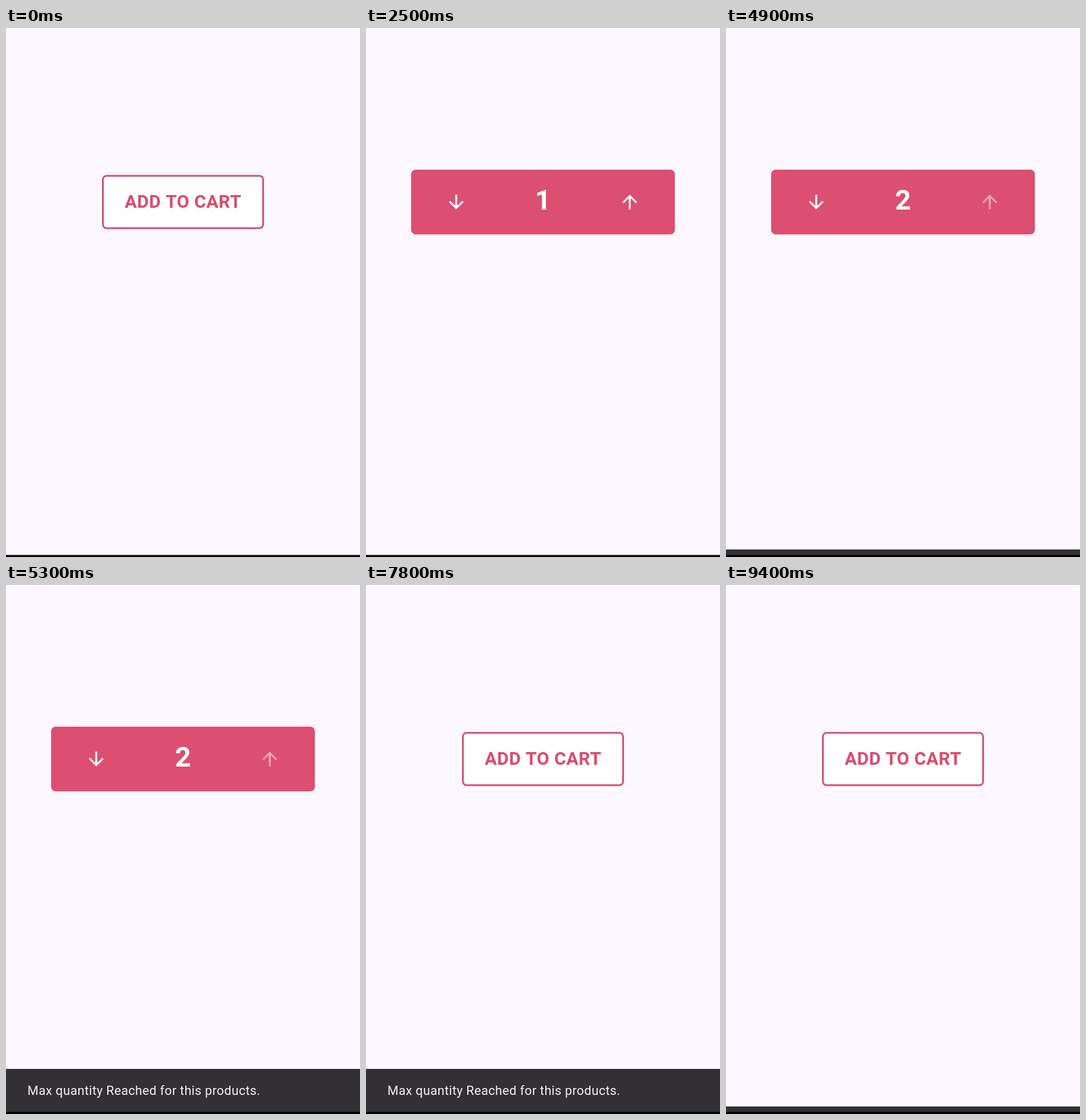
These frames come from a looping animation (612 px wide and 915 px high, 9500 ms). An HTML page with a canvas:

```html
<!DOCTYPE html>
<html lang="en">
<head>
<meta charset="utf-8">
<title>Add to cart</title>
<style>
  html, body { margin: 0; width: 100%; height: 100%; overflow: hidden; background: #fdf7ff; }
  canvas { display: block; width: 612px; height: 915px; }
</style>
</head>
<body>
<canvas id="stage" width="612" height="915"></canvas>
<script>
const ctx = document.getElementById('stage').getContext('2d');
const LOOP = 9500, STEP = 100;
const RED = '#dc4f71', EDGE = '#d94c70';
const FONT = 'Roboto, "Noto Sans", sans-serif';
const CX = 306, CY = 301, DIGIT_GAP = 80;
const SNACK_H = 75, FLOOR = 912;
const ARROW = new Path2D('M8 0l-1.41-1.41L1 4.17V-8h-2V4.17l-5.58-5.59L-8 0l8 8z');

const clamp = x => Math.min(1, Math.max(0, x));
const ramp = (t, from, to) => clamp((t - from) / (to - from));
const lerp = (a, b, k) => a + (b - a) * k;

// cubic-bezier(.4, 0, .2, 1)
function fastOutSlowIn(x) {
  let lo = 0, hi = 1, s = 0.5;
  for (let i = 0; i < 20; i++) {
    s = (lo + hi) / 2;
    const bx = 1.2 * s * (1 - s) ** 2 + 0.6 * s * s * (1 - s) + s ** 3;
    if (bx < x) lo = s; else hi = s;
  }
  return 3 * s * s - 2 * s ** 3;
}

// What is left of a digit roll, dying out after the tap
const rest = (first, dt) => dt < 300 ? first * Math.exp(-dt / 45) : 0;

function countAt(t, fade) {
  if (fade < 1) return fade * 1.09;
  if (t < 3500) return 1;
  if (t < 6800) return 2 - rest(0.04, t - 3500);
  return 1 + rest(0.175, t - 6800);
}

function snackAt(t) {
  return t < 9200
    ? fastOutSlowIn(ramp(t, 4850, 5100))
    : fastOutSlowIn(1 - ramp(t, 9200, 9450));
}

function box(x, y, w, h, r) {
  ctx.beginPath();
  ctx.roundRect(x, y, w, h, r);
}

function text(str, x, y, font, spacing, color, alpha, align) {
  ctx.font = font + ' ' + FONT;
  ctx.letterSpacing = spacing + 'px';
  ctx.textAlign = align;
  ctx.fillStyle = color;
  ctx.globalAlpha = alpha;
  ctx.fillText(str, x, y);
  ctx.globalAlpha = 1;
}

function arrow(x, dir, alpha) {
  ctx.save();
  ctx.translate(x, CY);
  ctx.scale(1.6, 1.6 * dir);
  ctx.globalAlpha = alpha;
  ctx.fillStyle = '#fff';
  ctx.fill(ARROW);
  ctx.restore();
}

function digit(n, shift, alpha) {
  if (alpha > 0.005) text(String(n), CX, 314 + shift * DIGIT_GAP, '700 48px', 0, '#fff', alpha, 'center');
}

function button(t) {
  const fade = ramp(t, 2300, 2500) - ramp(t, 7600, 7800);
  const w = fade > 0 ? 456 : 280;
  const h = lerp(93.5, 112, fade);
  const x = CX - w / 2, y = CY - h / 2;

  ctx.save();
  box(x, y, w, h, 8);
  ctx.clip();
  ctx.fillStyle = '#fff';
  ctx.fillRect(x + 1, y + 1, w - 2, h - 2);
  ctx.globalAlpha = fade;
  ctx.fillStyle = RED;
  ctx.fillRect(x, y, w, h);
  ctx.globalAlpha = 1;

  if (fade < 1) text('ADD TO CART', CX, 311, '600 31.2px', 0.39, EDGE, 1 - fade, 'center');
  if (fade > 0) {
    const spread = 210 - 60 * fade;
    const full = t >= 3500 && t < 6800;
    arrow(CX - spread, 1, fade);
    arrow(CX + spread, -1, full ? 0.5 : fade);
    const count = countAt(t, fade), low = Math.floor(count), part = count - low;
    digit(low, -part, (1 - part) * fade);
    digit(low + 1, 1 - part, part * fade);
  }
  ctx.restore();

  if (fade < 1) {
    box(x + 1.5, y + 1.5, w - 3, h - 3, 6.5);
    ctx.strokeStyle = EDGE;
    ctx.lineWidth = 3;
    ctx.stroke();
  }
}

function snackbar(t) {
  const open = snackAt(t);
  if (open < 0.001) return;
  const top = FLOOR - SNACK_H * open;
  ctx.fillStyle = '#322f35';
  ctx.fillRect(0, top, 612, FLOOR - top);
  text('Max quantity Reached for this products.', 37, top + 45, '400 21.9px', 0.39, '#f5eff7', 1, 'left');
}

function draw(now) {
  const t = Math.floor((now % LOOP) / STEP) * STEP;
  ctx.fillStyle = '#fdf7ff';
  ctx.fillRect(0, 0, 612, 915);
  button(t);
  snackbar(t);
  ctx.fillStyle = '#000';
  ctx.fillRect(0, FLOOR - 0.5, 612, 4);
}

let start;
function tick(now) {
  start ??= now;
  draw(Math.max(0, now - start));
  requestAnimationFrame(tick);
}
draw(0);
requestAnimationFrame(tick);
</script>
</body>
</html>
```
